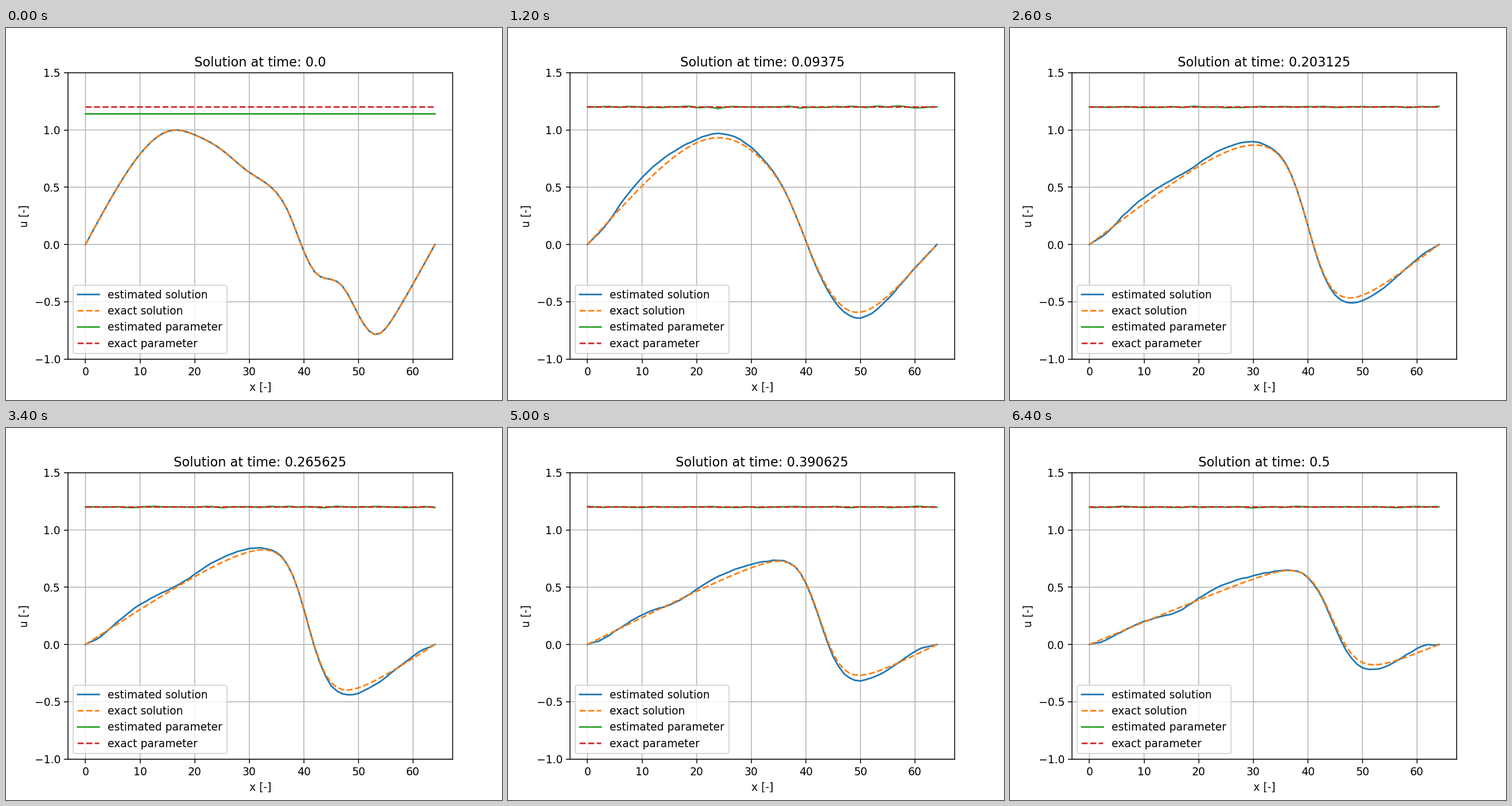
Recreate the animation shown at these times as a matplotlib script. Size 864 by 648 pixels, loop 6600 ms.

```python
import numpy as np
import matplotlib.pyplot as plt
from matplotlib.animation import FuncAnimation

FRAMES, INTERVAL = 33, 200
CELLS = 64
SPEED, VISCOSITY = 1.2, 0.025
SUBSTEPS = 20

x = np.arange(CELLS + 1.0)
rng = np.random.default_rng(4)


def spline(points, xs):
    """Natural cubic spline through (x, y) points."""
    xk, yk = np.array(points, float).T
    n, h = len(xk), np.diff(xk)
    d = np.diff(yk) / h
    a, r = np.eye(n), np.zeros(n)
    for i in range(1, n - 1):
        a[i, i - 1:i + 2] = h[i - 1], 2 * (h[i - 1] + h[i]), h[i]
        r[i] = 6 * (d[i] - d[i - 1])
    m = np.linalg.solve(a, r)
    i = np.clip(np.searchsorted(xk, xs) - 1, 0, n - 2)
    t = xs - xk[i]
    slope = d[i] - h[i] * (2 * m[i] + m[i + 1]) / 6
    return yk[i] + t * slope + t**2 * m[i] / 2 + t**3 * (m[i + 1] - m[i]) / (6 * h[i])


def burgers(u):
    """Solve the viscous Burgers equation, one row per frame."""
    dx, dt = 1 / CELLS, 1 / (CELLS * SUBSTEPS)
    rows = [u.copy()]
    for _ in range(FRAMES - 1):
        for _ in range(SUBSTEPS):
            flux = SPEED * u**2 / 2
            advection = (flux[2:] - flux[:-2]) / (2 * dx)
            diffusion = VISCOSITY * (u[2:] - 2 * u[1:-1] + u[:-2]) / dx**2
            u[1:-1] += dt * (diffusion - advection)
        rows.append(u.copy())
    return rows


def estimation_error(n):
    """Slowly growing and fading bumps: centre, width, first and last height."""
    bumps = [(3, 2, -.03, -.02), (10.5, 4.5, .09, .005), (16, 2.5, .02, -.04),
             (25.5, 5, .035, .045), (50, 4.5, -.05, -.045), (60.5, 2.5, 0, .045)]
    w = n / (FRAMES - 1)
    total = sum(((1 - w) * first + w * last) * np.exp(-((x - centre) / width)**2 / 2)
                for centre, width, first, last in bumps)
    return min(n / 6, 1) * total * edge


start = [(0, 0), (5, .43), (10, .79), (16, .998), (20, .957), (25, .825),
         (30, .63), (34, .5), (37, .3), (40, -.06), (42, -.24), (44.5, -.3),
         (47, -.36), (50, -.615), (53, -.785), (57, -.59), (64, 0)]
edge = np.clip(np.minimum(x, CELLS - x) / 2, 0, 1)

exact = burgers(spline(start, x))
estimate, parameter = [exact[0]], [np.full_like(x, 1.14)]
rough = np.zeros_like(x)
for n in range(1, FRAMES):
    rough = 0.9 * rough + 0.44 * rng.normal(size=x.size)
    wobble = 0.0025 * min(n / 6, 1) * rough * edge
    estimate.append(exact[n] + estimation_error(n) + wobble)
    noise = np.convolve(rng.normal(size=x.size + 2), [0.3, 0.8, 0.3], "valid")
    spread = 0.003 + 0.012 * np.exp(-n / 3)
    parameter.append(1.2 - 0.06 * np.exp(-1.5 * n) + spread * noise)

fig, ax = plt.subplots(figsize=(6.4, 4.8), dpi=135)
est_line, = ax.plot(x, estimate[0], label="estimated solution")
exact_line, = ax.plot(x, exact[0], "--", label="exact solution")
par_line, = ax.plot(x, parameter[0], label="estimated parameter", snap=False)
ax.plot(x, np.full_like(x, 1.2), "--", label="exact parameter", snap=False)
ax.set_ylim(-1, 1.5)
ax.set_xlabel("x [-]")
ax.set_ylabel("u [-]")
ax.grid(snap=False)
legend = ax.legend(loc="lower left")
for handle in legend.get_lines():
    handle.set_snap(False)
title = ax.set_title("")


def update(n):
    est_line.set_ydata(estimate[n])
    exact_line.set_ydata(exact[n])
    par_line.set_ydata(parameter[n])
    title.set_text(f"Solution at time: {n / CELLS}")
    return est_line, exact_line, par_line, title


anim = FuncAnimation(fig, update, frames=FRAMES, interval=INTERVAL,
                     repeat=True, repeat_delay=0, blit=False)
plt.show()
```
